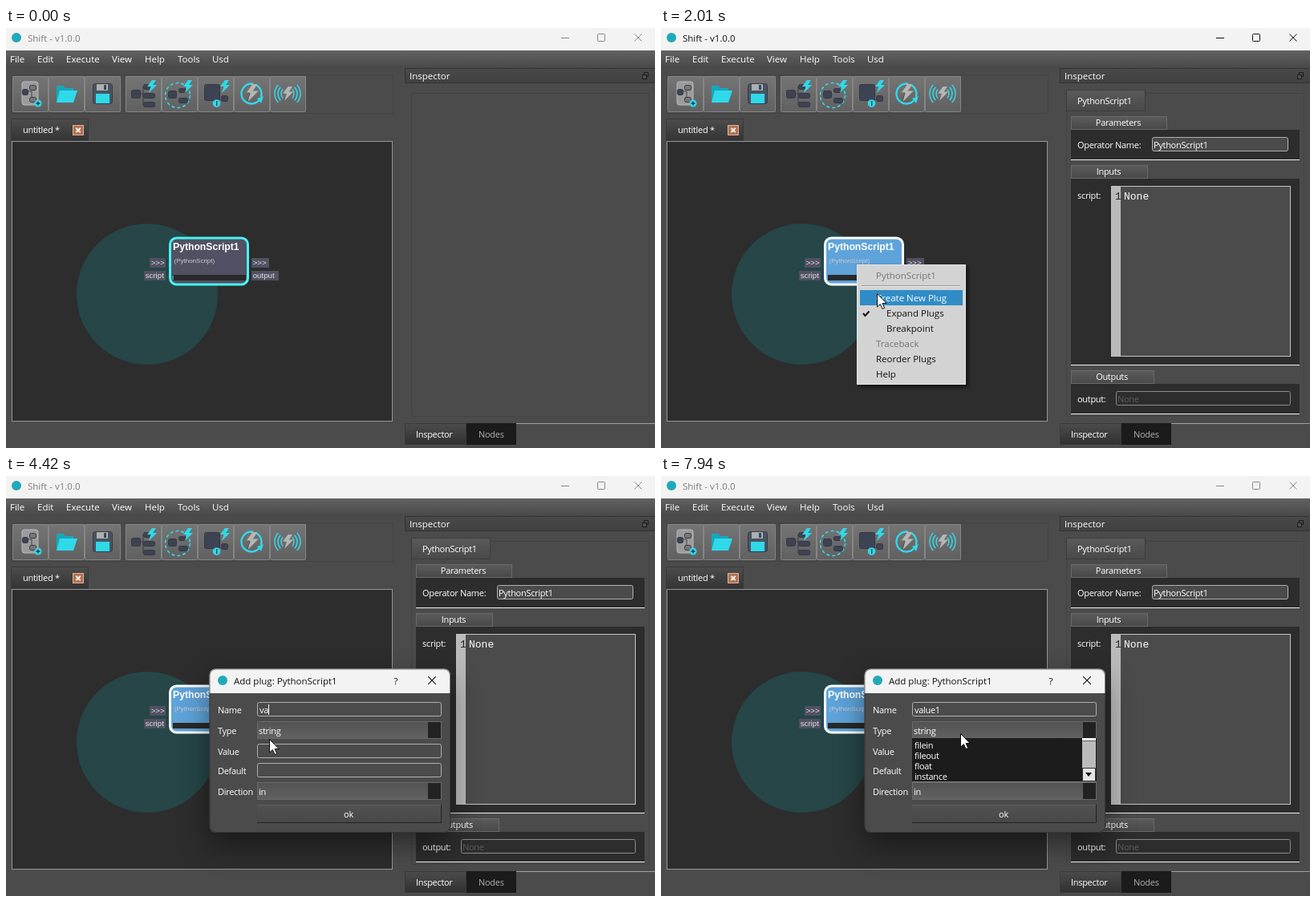
An HTML page with a canvas that plays this animation: 809 by 524 pixels, repeating every 8000 ms.

```html
<!DOCTYPE html>
<html lang="en">
<head>
<meta charset="utf-8">
<title>Node editor</title>
<style>
html, body { margin: 0; width: 100%; height: 100%; overflow: hidden; background: #4b4b4b; }
canvas { display: block; }
</style>
</head>
<body>
<canvas id="stage" width="809" height="524"></canvas>
<script>
const W = 809, H = 524, LOOP = 8000;
const stage = document.getElementById('stage').getContext('2d');
const dialogLayer = document.createElement('canvas');
dialogLayer.width = W;
dialogLayer.height = H;
const dialogCtx = dialogLayer.getContext('2d');
let g = stage;

const CYAN = '#2fd9ea', DARK = '#2d2d2d', BODY = '#4b4b4b', SLATE = '#515163', LOGO = '#22a9b8';
const sans = '"Open Sans", "Noto Sans", sans-serif';
const arial = '"Liberation Sans", Arial, sans-serif';
const FONTS = {
  ui: ['11.5px ' + sans, 0],
  small: ['11px ' + sans, -0.3],
  node: ['bold 12.2px ' + arial, 0],
  sub: ['8px ' + arial, 0],
  port: ['9.7px ' + arial, 0],
  code: ['13px "Liberation Mono", monospace', 0]
};

// ---------- helpers ----------
function setFont(name) {
  g.font = FONTS[name][0];
  g.letterSpacing = FONTS[name][1] + 'px';
}
function text(s, x, y, font = 'small', color = '#fff', align = 'left') {
  setFont(font);
  g.fillStyle = color;
  g.textAlign = align;
  g.fillText(s, x, y);
}
function rect(x, y, w, h, fill) {
  g.fillStyle = fill;
  g.fillRect(x, y, w, h);
}
function frame(x, y, w, h, color) {
  g.strokeStyle = color;
  g.lineWidth = 1;
  g.strokeRect(x + .5, y + .5, w - 1, h - 1);
}
function grad(x, y, w, h, top, bottom) {
  const f = g.createLinearGradient(0, y, 0, y + h);
  f.addColorStop(0, top);
  f.addColorStop(1, bottom);
  rect(x, y, w, h, f);
}
function round(x, y, w, h, r, fill, stroke, lw = 1) {
  g.beginPath();
  g.roundRect(x, y, w, h, r);
  if (fill) { g.fillStyle = fill; g.fill(); }
  if (stroke) { g.strokeStyle = stroke; g.lineWidth = lw; g.stroke(); }
}
function disc(x, y, r, fill) {
  g.fillStyle = fill;
  g.beginPath();
  g.arc(x, y, r, 0, Math.PI * 2);
  g.fill();
}
function arc(x, y, r, a, b, color, lw) {
  g.strokeStyle = color;
  g.lineWidth = lw;
  g.beginPath();
  g.arc(x, y, r, a, b);
  g.stroke();
}
function lines(color, lw, ...paths) {
  g.strokeStyle = color;
  g.lineWidth = lw;
  g.beginPath();
  for (const p of paths)
    for (let i = 0; i < p.length; i += 2) i ? g.lineTo(p[i], p[i + 1]) : g.moveTo(p[0], p[1]);
  g.stroke();
}
function poly(fill, x, y, pts) {
  g.fillStyle = fill;
  g.beginPath();
  for (let i = 0; i < pts.length; i += 2) g.lineTo(x + pts[i], y + pts[i + 1]);
  g.closePath();
  g.fill();
}
function cross(x, y, r, color, lw = 1) {
  lines(color, lw, [x - r, y - r, x + r, y + r], [x - r, y + r, x + r, y - r]);
}
const clamp = v => Math.max(0, Math.min(1, v));
const within = (t, a, b) => t >= a && t < b;

// ---------- motion ----------
// time, x, y of the pointer
const PATH = [
  [190, 612, 418], [720, 244, 295], [1470, 244, 295], [2010, 269, 331], [2080, 269, 331],
  [2150, 270, 333], [2900, 270, 333], [3090, 320, 360], [3440, 320, 360], [3700, 328, 328],
  [6570, 328, 328], [6900, 368, 437], [6970, 368, 437], [7800, 373, 321]
];
function pointerAt(t) {
  let a = PATH[0];
  for (const b of PATH) {
    if (t < b[0]) {
      const p = clamp((t - a[0]) / (b[0] - a[0]));
      const e = p * p * (3 - 2 * p);
      return [Math.round(a[1] + (b[1] - a[1]) * e), Math.round(a[2] + (b[2] - a[2]) * e)];
    }
    a = b;
  }
  return [a[1], a[2]];
}
const KEYS = [4030, 4420, 4560, 4780, 4980, 5380];
const typedAt = t => 'value1'.slice(0, KEYS.filter(k => t >= k).length);
const caretOn = t => within(t, 2560, 3090) || within(t, 3510, 6040) ||
  within(t, 6570, 7100) || within(t, 7630, 7870);

// ---------- main window ----------
function titleBar(active) {
  rect(0, 0, W, 28, '#f3f3f3');
  disc(13, 12, 6, LOGO);
  text('Shift - v1.0.0', 27, 17, 'ui', active ? '#111' : '#7c7c7c');
  const c = active ? '#111' : '#858585';
  rect(692, 12, 10, 1, c);
  round(737.5, 7.5, 9, 9, 1, null, c);
  cross(788, 12, 4.5, c);
}

function menuBar() {
  grad(0, 28, W, 22, '#626262', '#484848');
  [['File', 5], ['Edit', 39], ['Execute', 75], ['View', 132], ['Help', 173], ['Tools', 214], ['Usd', 257]]
    .forEach(([s, x]) => text(s, x, 43, 'ui'));
}

const bolt = (x, y, k = 1, color = CYAN) =>
  poly(color, x, y, [6, 0, 0, 8, 4.5, 8, 2, 16, 12, 6, 7, 6, 11, 0].map(v => v * k));

const block = (x, y, w, h, fill = '#3d4352') => round(x + .5, y + .5, w, h, 2, fill, '#343842');

const ICONS = [
  [8, x => {
    round(x + 12, 67, 20, 29, 3, '#9b9b9b', '#bcbcbc');
    block(x + 12, 76, 7, 7);
    block(x + 21, 71, 8, 6, '#777');
    block(x + 21, 86, 8, 6, '#777');
    lines('#444', 1, [x + 19, 79, x + 24, 79, x + 24, 86]);
    disc(x + 32, 94, 4.5, CYAN);
    lines('#2b3a44', 1.4, [x + 29.5, 94, x + 34.5, 94], [x + 32, 91.5, x + 32, 96.5]);
  }],
  [53, x => {
    poly('#15a8ba', x + 10, 72, [0, 0, 9, 0, 11, 3, 21, 3, 21, 20, 0, 20]);
    poly(CYAN, x + 10, 78, [4, 0, 26, 0, 21, 15, 0, 15]);
  }],
  [98, x => {
    round(x + 10.5, 69.5, 24, 25, 3, '#4a5360', '#343a44');
    rect(x + 15, 70, 14, 8, '#a9b0b4');
    rect(x + 24, 71, 3, 6, '#3d4450');
    rect(x + 14, 82, 17, 12, CYAN);
  }],
  [149, x => {
    lines('#363a44', 1, [x + 18, 82, x + 22, 82, x + 22, 73], [x + 22, 82, x + 22, 96, x + 26, 96]);
    block(x + 7, 77, 11, 10);
    block(x + 22, 70, 9, 6);
    block(x + 22, 81, 14, 6);
    block(x + 22, 92, 14, 6);
    bolt(x + 27, 65);
  }],
  [194, x => {
    g.setLineDash([4, 3]);
    arc(x + 20, 84, 15.5, 0, Math.PI * 2, CYAN, 1.6);
    g.setLineDash([]);
    block(x + 8, 78, 10, 9);
    block(x + 21, 75, 9, 5);
    block(x + 21, 87, 11, 6);
    bolt(x + 27, 65);
  }],
  [239, x => {
    block(x + 8, 70, 19, 20);
    block(x + 29, 84, 8, 7);
    bolt(x + 28, 65);
    disc(x + 23.5, 94, 4.8, CYAN);
    rect(x + 23, 91, 1.3, 6, '#27404a');
  }],
  [284, x => {
    arc(x + 22, 82, 12.5, .75, 4.9, CYAN, 2.4);
    arc(x + 22, 82, 12.5, 5.2, 6.6, CYAN, 2.4);
    poly(CYAN, x + 29, 88, [0, 0, 8, -3, 5, 6]);
    bolt(x + 14, 70, 1.4, '#b5b5b5');
    lines('#4a4a4a', .8, [x + 22, 71, x + 15, 81, x + 20, 81, x + 17, 92]);
  }],
  [329, x => {
    for (const r of [8, 12, 16]) {
      arc(x + 22, 82, r, -.75, .75, CYAN, 1.5);
      arc(x + 22, 82, r, Math.PI - .75, Math.PI + .75, CYAN, 1.5);
    }
    bolt(x + 16, 73, 1.1, '#b5b5b5');
  }]
];

function toolBar() {
  frame(7, 58, 476, 49, '#444');
  for (const [x, draw] of ICONS) {
    grad(x, 60, 45, 45, '#757575', '#606060');
    round(x + .5, 60.5, 44, 44, 2, null, '#858585');
    draw(x);
  }
}

function node(selected, hover) {
  round(204.5, 262, 97, 58, 8, selected ? '#5ea3da' : SLATE);
  rect(208, 308, 91, 7, '#292929');
  if (!selected) rect(207, 309, 2, 5, '#3f8f98');
  round(204.5, 262, 97, 58, 8, null, selected || hover ? '#fff' : '#4af2f2', 3);
  text('PythonScript1', 208, 277, 'node');
  text('(PythonScript)', 209.5, 293, 'sub', '#cfcaca');
  for (const [s, x, y, w] of [['>>>', 179, 287, 20], ['script', 172, 303, 27], ['>>>', 306, 287, 22], ['output', 306, 303, 34]]) {
    rect(x, y, w, 12, SLATE);
    text(s, x + 1.7, y + 9, 'port', '#e2e2e2');
  }
}

function graph(selected, hover) {
  grad(6, 113, 97, 28, '#4d4d4d', '#343434');
  frame(6, 113, 97, 28, '#3a3a3a');
  text('untitled *', 21, 131);
  rect(83, 121, 14, 13, '#b5714f');
  frame(83, 121, 14, 13, '#d9b39f');
  cross(90, 127.5, 2.7, '#fff', 1.8);
  rect(7, 141, 475, 350, DARK);
  frame(7, 141, 475, 350, '#969696');
  disc(176, 332, 88, '#264648');
  node(selected, hover);
}

// ---------- inspector ----------
function section(title, y, w, top, bottom) {
  grad(511, y, w, 17, '#5c5c5c', '#484848');
  frame(511, y, w, 17, '#6a6a6a');
  text(title, 511 + w / 2 - 1, y + 12, 'small', '#fff', 'center');
  rect(511, top, 285, bottom - top, DARK);
  rect(511, bottom, 285, 1, '#f2f2f2');
}
function field(x, y, w, h, fill = BODY, border = '#b0b0b0') {
  round(x + .5, y + .5, w - 1, h - 1, 2, fill, border);
}

function inspector(filled) {
  grad(497, 50, 312, 19, '#4a4a4a', '#404040');
  frame(497, 50, 313, 19, '#333');
  text('Inspector', 503, 64, 'ui');
  frame(795, 55, 6, 6, '#1d1d1d');
  rect(793, 58, 6, 6, '#505050');
  frame(793, 58, 6, 6, '#1d1d1d');
  frame(505, 81, 297, 404, '#434343');
  if (filled) {
    grad(505, 77, 99, 27, '#5a5a5a', '#494949');
    frame(505, 77, 99, 27, '#3d3d3d');
    text('PythonScript1', 519, 95);

    section('Parameters', 110, 120, 127, 164);
    text('Operator Name:', 519, 150);
    field(612, 136, 170, 18);
    text('PythonScript1', 614, 150);

    section('Inputs', 171, 96, 188, 420);
    text('script:', 519, 213);
    rect(561, 197, 224, 213, BODY);
    rect(562, 198, 11, 211, '#bababa');
    frame(561, 197, 224, 213, '#c4c4c4');
    text('1', 566, 214, 'code', '#222');
    text('None', 577, 214, 'code');

    section('Outputs', 427, 104, 444, 481);
    text('output:', 519, 467);
    field(567, 453, 218, 18, DARK, '#8c8c8c');
    text('None', 569, 467, 'small', '#5c5c5c');
  }
  rect(636, 493, 173, 1, '#a0a0a0');
  grad(497, 493, 77, 27, '#4c4c4c', '#303030');
  frame(497, 493, 77, 27, '#3a3a3a');
  rect(574, 493, 62, 27, '#1b1b1b');
  text('Inspector', 511, 511);
  text('Nodes', 589, 511, 'small', '#b0b0b0');
}

// ---------- popup menu ----------
function contextMenu(pointerY) {
  g.save();
  g.shadowColor = 'rgba(0,0,0,.6)';
  g.shadowBlur = 5;
  g.shadowOffsetX = g.shadowOffsetY = 3;
  rect(244, 295, 136, 150, '#d3d3d3');
  g.restore();
  frame(244, 295, 136, 150, '#e6e6e6');
  const hot = pointerY > 326;
  if (hot) rect(248, 327, 128, 19, '#308cc6');
  rect(250, 321, 123, 1, '#989898');
  rect(250, 322, 123, 1, '#efefef');
  const ink = '#111', dim = '#767676';
  [['PythonScript1', 268, 313, dim], ['Create New Plug', 268, 341, hot ? '#fff' : ink], ['Expand Plugs', 281, 360, ink],
   ['Breakpoint', 281, 379, ink], ['Traceback', 268, 398, dim], ['Reorder Plugs', 268, 417, ink], ['Help', 268, 436, ink]]
    .forEach(([s, x, y, c]) => text(s, x, y, 'ui', c));
  lines('#111', 2, [252, 356, 254.5, 359, 259.5, 353.5]);
}

// ---------- dialog ----------
function combo(y, value) {
  grad(313, y, 230, 22, '#525252', '#626262');
  frame(313, y, 230, 22, '#6a6a6a');
  rect(526, y + 1, 16, 20, '#222');
  text(value, 315, y + 16);
}

function dropdown(h) {
  g.save();
  g.beginPath();
  g.rect(313, 327, 230, h);
  g.clip();
  g.translate(0, h - 55);
  rect(313, 327, 230, 55, '#1c1c1c');
  ['filein', 'fileout', 'float', 'instance'].forEach((s, i) => text(s, 316, 340 + i * 13));
  rect(525, 327, 17, 54, '#fff');
  for (let y = 331; y < 364; y++)
    for (let x = 525 + y % 2; x < 542; x += 2) rect(x, y, 1, 1, '#777');
  rect(525, 330, 17, 1, '#555');
  rect(525, 364, 17, 17, '#333');
  rect(526, 365, 15, 15, '#e4e4e4');
  poly('#111', 529, 370, [0, 0, 8, 0, 4, 5]);
  rect(313, 381, 230, 1, '#777');
  g.restore();
}

function dialog(t) {
  const name = typedAt(t), valid = name !== '';
  g.clearRect(0, 0, W, H);
  g.save();
  g.beginPath();
  g.roundRect(253.5, 240.5, 300.5, 204.5, 8);
  g.clip();
  rect(253, 240, 302, 206, BODY);
  rect(253, 240, 302, 31, '#f3f3f3');
  g.restore();
  round(254, 241, 299.5, 203.5, 8, null, 'rgba(40,40,40,.6)');
  disc(270, 255, 6, LOGO);
  text('Add plug: PythonScript1', 284, 260, 'ui', '#111');
  text('?', 486, 260, 'ui', '#111', 'center');
  cross(531, 255, 4.8, '#111', 1.1);
  [['Name', 296], ['Type', 322], ['Value', 348], ['Default', 372], ['Direction', 398]]
    .forEach(([s, y]) => text(s, 264, y));

  if (valid) field(313, 282, 230, 18);
  else {
    round(314, 283, 229, 17, 2, '#ff7474', '#ee1515', 2);
  }
  text(name, 316, 296);
  if (caretOn(t)) rect(Math.round(316 + g.measureText(name).width), 285, 1, 13, valid ? '#fff' : '#444');
  combo(306, 'string');
  field(313, 334, 230, 18);
  field(313, 358, 230, 18);
  combo(382, 'in');

  grad(313, 410, 230, 23, '#525252', '#474747');
  rect(313, 410, 230, 1, '#5c5c5c');
  rect(313, 432, 230, 1, '#242424');
  rect(542, 410, 1, 23, '#242424');
  text('ok', 427, 426, 'small', valid ? '#fff' : '#858585', 'center');
  if (t >= 7870) dropdown(t < 7940 ? 27 : 55);
}

function showDialog(t) {
  g = dialogCtx;
  dialog(t);
  g = stage;
  const p = clamp((t - 2420) / 270);
  const s = .835 + .165 * p;
  g.save();
  g.globalAlpha = Math.pow(p, 1.4);
  g.shadowColor = 'rgba(0,0,0,.45)';
  g.shadowBlur = 36;
  g.shadowOffsetY = 14;
  g.translate(342, 321);
  g.scale(s, s);
  g.drawImage(dialogLayer, -342, -321);
  g.restore();
}

function pointer(x, y) {
  g.save();
  g.translate(x + .5, y + .5);
  g.beginPath();
  [[0, 0], [0, 16.5], [3.8, 13], [6.6, 19], [9.2, 17.8], [6.5, 12], [11.6, 12]].forEach(p => g.lineTo(...p));
  g.closePath();
  g.fillStyle = '#fff';
  g.strokeStyle = '#111';
  g.lineWidth = 1;
  g.fill();
  g.stroke();
  g.restore();
}

function draw(t) {
  const [px, py] = pointerAt(t);
  const selected = t >= 1050;
  rect(0, 0, W, H, BODY);
  titleBar(within(t, 1050, 2420));
  menuBar();
  toolBar();
  graph(selected, t >= 190 && px < 302 && py < 320);
  inspector(selected);
  if (within(t, 1120, 2350)) contextMenu(py);
  if (t >= 2420) showDialog(t);
  if (t >= 190) pointer(px, py);
}

const start = performance.now();
function tick() {
  draw((performance.now() - start) % LOOP);
  requestAnimationFrame(tick);
}
tick();
</script>
</body>
</html>
```
